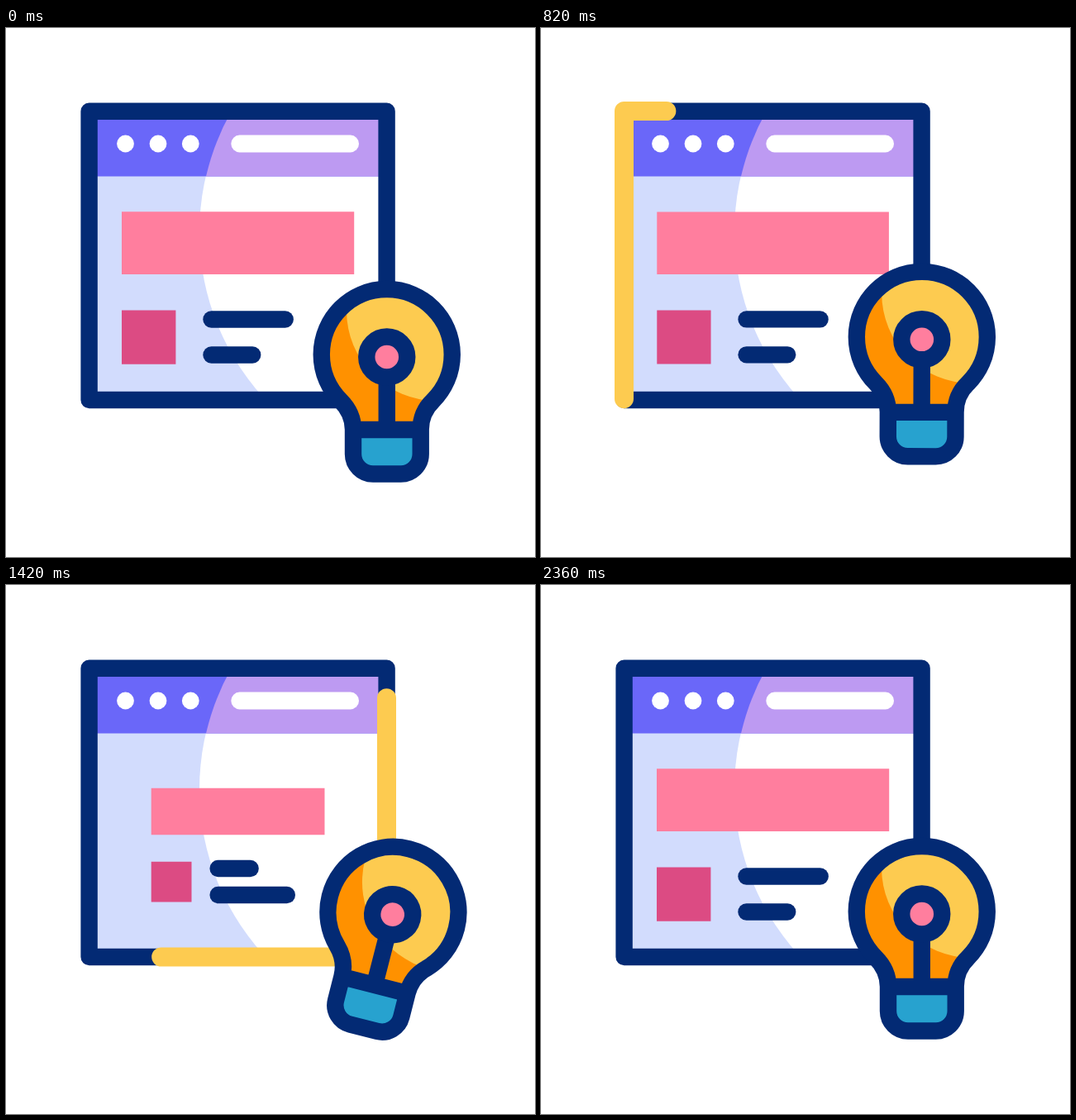
Recreate the animation shown at these times as an HTML page. Size 640 px wide and 640 px high, loop 2.4 s.

```html
<!DOCTYPE html>
<html lang="en">
<head>
<meta charset="utf-8">
<title>Web design idea</title>
<style>
html, body { margin: 0; height: 100%; overflow: hidden; background: #fff; }
svg { display: block; width: 100%; height: 100%; }
.line { fill: none; stroke: #032a74; stroke-width: 20.4; stroke-linecap: round; stroke-linejoin: round; }
</style>
</head>
<body>
<svg viewBox="0 0 640 640">
  <defs>
    <clipPath id="page"><path d="M100 100H460V450H100Z"/></clipPath>
    <clipPath id="glass"><path d="M420 486C420 472 414 460 405 451A79 79 0 1 1 516.5 451C507 460 501.7 472 501.7 486Z"/></clipPath>
  </defs>

  <g clip-path="url(#page)">
    <path fill="#d2dcfd" d="M100 100H460V450H100Z"/>
    <circle cx="531" cy="247" r="297" fill="#fff"/>
    <path fill="#6a67f9" d="M100 100H460V179.5H100Z"/>
    <path fill="#bd9af2" d="M242 179.5A297 297 0 0 1 273 100H460V179.5Z"/>
  </g>
  <g fill="#fff">
    <circle cx="144.5" cy="140" r="10.4"/>
    <circle cx="184" cy="140" r="10.4"/>
    <circle cx="223.3" cy="140" r="10.4"/>
    <rect x="272.3" y="129.6" width="154.7" height="20.8" rx="10.4"/>
  </g>

  <g id="blocks">
    <path fill="#ff7e9e" d="M140 222.3H421.2V298H140Z"/>
    <path fill="#dc4b83" d="M140 341.6H205.4V406.8H140Z"/>
  </g>
  <path id="line1" class="line"/>
  <path id="line2" class="line"/>

  <path class="line" d="M100.6 100.8H460.6V450H100.6Z"/>
  <path id="glow" class="line" style="stroke:#fdcb50;stroke-width:23" d="M100.5 450V100.5H460.5V450H100.5"/>

  <g id="bulb">
    <g clip-path="url(#glass)">
      <path fill="#ff9100" d="M370 306H552V490H370Z"/>
      <circle cx="521" cy="342" r="109" fill="#fdcb50"/>
    </g>
    <path fill="#27a2cf" d="M420 486H501.7V515.5a24 24 0 0 1-24 24H444a24 24 0 0 1-24-24Z"/>
    <path class="line" d="M420 486C420 472 414 460 405 451A79 79 0 1 1 516.5 451C507 460 501.7 472 501.7 486V515.5a24 24 0 0 1-24 24H444a24 24 0 0 1-24-24ZH501.7M460.75 430V480"/>
    <circle class="line" cx="460.75" cy="398" r="24.5" style="fill:#ff7e9e"/>
  </g>
</svg>
<script>
const LOOP = 2400, EDGE = 1417;
const $ = id => document.getElementById(id);
const clamp = (v, lo, hi) => Math.min(hi, Math.max(lo, v));

function draw(t) {
  const part = (a, b) => clamp((t - a) / (b - a), 0, 1);
  const ease = (a, b) => part(a, b) ** 2 * (3 - 2 * part(a, b));

  // page content shrinks around its middle; text lines keep their thickness
  const s = 1 - .254 * (ease(800, 1200) - ease(1880, 2320));
  const px = x => 280.6 + (x - 280.6) * s;
  const py = y => 315 + (y - 315) * s;
  $('blocks').setAttribute('transform', `translate(280.6 315) scale(${s}) translate(-280.6 -315)`);

  // the two text lines trade lengths
  const swap = ease(1200, 1500) - ease(1680, 1900);
  const textLine = (id, y, len) =>
    $(id).setAttribute('d', `M${px(248.5)} ${py(y)}H${px(248.5 + len)}`);
  textLine('line1', 352.5, 89.2 * (1 - .5 * swap));
  textLine('line2', 395.5, 49.7 * (1 + 1.5 * swap));

  // light running round the window frame
  const head = EDGE * ease(400, 1600), tail = EDGE * ease(800, 2000);
  const glow = $('glow').style;
  glow.display = head > tail ? '' : 'none';
  glow.strokeDasharray = `${head - tail} 3000`;
  glow.strokeDashoffset = -tail;

  // bulb hops up, sways one and a half times, then leans aside
  const hop = ease(200, 400) - ease(810, 1000);
  const sway = ease(810, 1000) - ease(1700, 2020);
  const wave = Math.cos(2 * Math.PI * (clamp(t, 1000, 1660) - 1000) / 440);
  const lean = Math.sin(Math.PI * part(2020, 2360)) ** 2;
  const dy = -21.4 * hop - 5.4 * (1 - wave) * sway;
  const turn = (2.6 + 12.2 * wave) * sway + 15 * lean;
  $('bulb').setAttribute('transform', `translate(${18 * lean} ${dy}) rotate(${turn} 460.75 426)`);
}

const start = performance.now();
function tick() {
  draw((performance.now() - start) % LOOP);
  requestAnimationFrame(tick);
}
tick();
</script>
</body>
</html>
```
